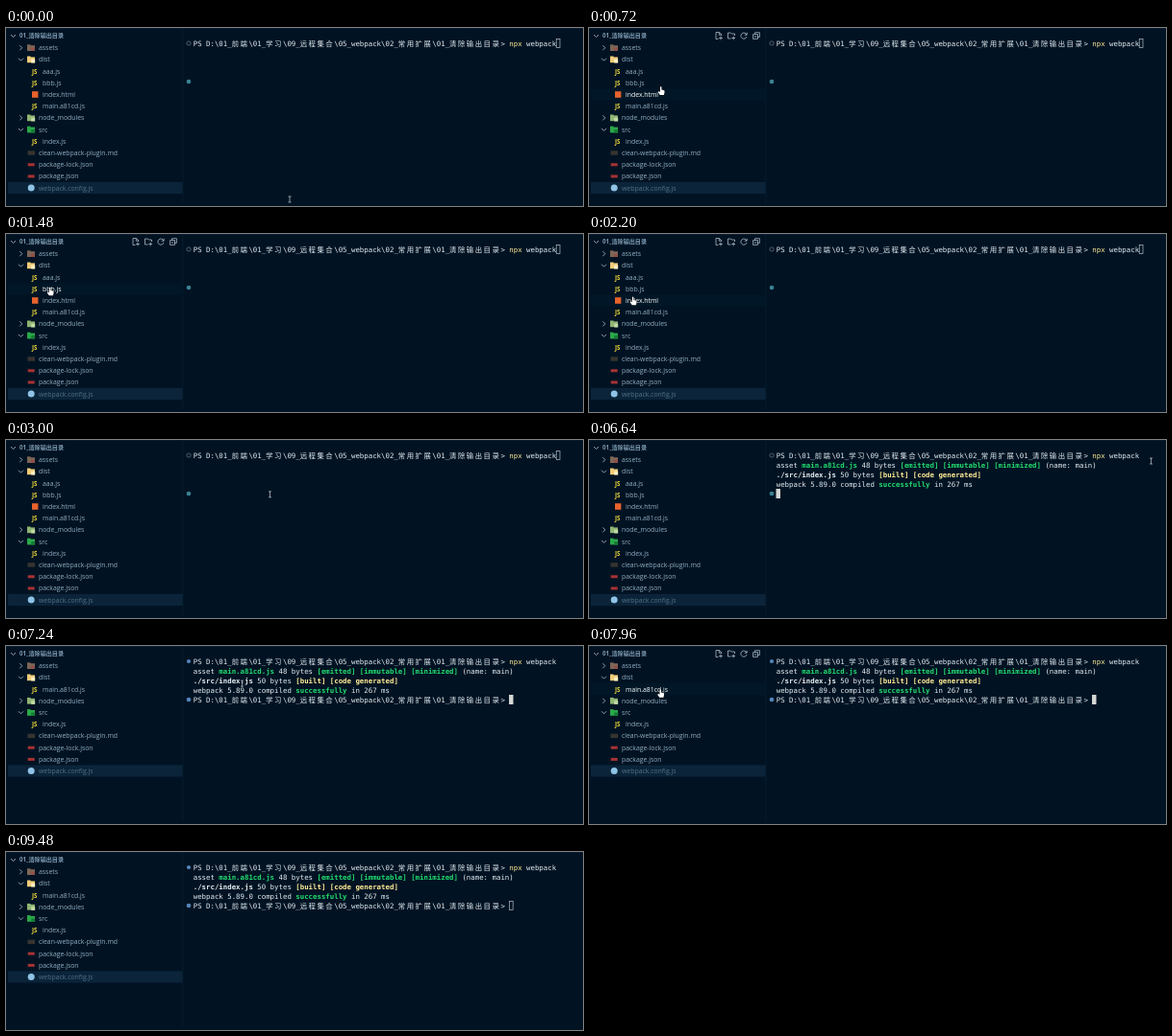
Recreate the animation shown at these times as an HTML page with a canvas. Size 600 by 186 pixels, loop 9520 ms.

```html
<!DOCTYPE html>
<html lang="zh-CN">
<head>
<meta charset="utf-8">
<title>Cleaning the output folder</title>
<style>
  html, body { margin: 0; width: 100%; height: 100%; overflow: hidden; background: #011323; }
  canvas { display: block; width: 600px; height: 186px; }
</style>
</head>
<body>
<canvas id="stage"></canvas>
<script>
const LOOP = 9520, STEP = 40;
const SIDEBAR = 183.5, ROW_TOP = 20.7, ROW = 12.2;
const COL = 4.44, TERM_X = 194.7, TERM_Y = 16, LINE = 10;
const FOCUS = 3880, ENTER = 4200, OUTPUT = 6640, CLEANED = 6960, PROMPT = 7000, BLUR = 9280;
const MOUSE_GONE = 8880;

const UI_FONT = '"Open Sans", "Noto Sans CJK SC", "Noto Sans CJK", sans-serif';
const MONO_FONT = '"DejaVu Sans Mono", "Noto Sans CJK SC", "Noto Sans CJK", monospace';
const BG = '#011323', TEXT = '#93adc1', TITLE = '#7f9bb2', DIM = '#527087', WHITE = '#e4ebf1';
const GREEN = '#22da6e', YELLOW = '#ffeb95', BULLET = '#5485bb';

const PATH = 'PS D:\\01_前端\\01_学习\\09_远程集合\\05_webpack\\02_常用扩展\\01_清除输出目录> ';
const COMMAND = [[PATH, WHITE], ['npx', YELLOW], [' webpack', WHITE]];
const RESULT = [
  [['asset ', WHITE], ['main.a81cd.js', GREEN, 1], [' 48 bytes ', WHITE],
   ['[emitted] [immutable] [minimized]', GREEN, 1], [' (name: main)', WHITE]],
  [['./src/index.js', WHITE, 1], [' 50 bytes ', WHITE], ['[built] [code generated]', YELLOW, 1]],
  [['webpack 5.89.0 compiled ', WHITE], ['successfully', GREEN, 1], [' in 267 ms', WHITE]]
];

// name, icon, indent level, state
const TREE = [
  ['assets', 'assets', 0, 'closed'],
  ['dist', 'dist', 0, 'open'],
  ['aaa.js', 'js', 1, 'removed'],
  ['bbb.js', 'js', 1, 'removed'],
  ['index.html', 'html', 1, 'removed'],
  ['main.a81cd.js', 'js', 1],
  ['node_modules', 'modules', 0, 'closed'],
  ['src', 'src', 0, 'open'],
  ['index.js', 'js', 1],
  ['clean-webpack-plugin.md', 'md', 0],
  ['package-lock.json', 'package', 0],
  ['package.json', 'package', 0],
  ['webpack.config.js', 'config', 0, 'selected']
];
const FOLDERS = { assets: '#7d6557', dist: '#f0cd79', modules: '#8fb573', src: '#2aa84a' };

// time, x, y
const MOUSE = [
  [0, 295, 179], [120, 280, 170], [480, 120, 80], [720, 75, 63.6], [960, 72, 60],
  [1200, 48, 47], [1480, 46, 58], [1760, 50, 84], [1960, 48, 74], [2200, 46, 68],
  [2480, 60, 72], [2840, 190, 66], [3240, 430, 40], [3640, 583, 22], [3840, 584.5, 22],
  [6680, 584.5, 22], [7080, 330, 30], [7480, 90, 56], [7960, 74.5, 47.5], [8240, 70, 50],
  [8520, 110, 70], [8880, 490, 110]
];

const canvas = document.getElementById('stage');
const ctx = canvas.getContext('2d');
const ratio = window.devicePixelRatio || 1;
canvas.width = 600 * ratio;
canvas.height = 186 * ratio;

function rect(x, y, w, h, color) {
  ctx.fillStyle = color;
  ctx.fillRect(x, y, w, h);
}

function circle(x, y, r, color, hollow) {
  ctx.beginPath();
  ctx.arc(x, y, r, 0, 7);
  ctx.fillStyle = ctx.strokeStyle = color;
  ctx.lineWidth = 0.7;
  hollow ? ctx.stroke() : ctx.fill();
}

function stroke(x, y, d, color, width = 0.7) {
  ctx.save();
  ctx.translate(x, y);
  ctx.strokeStyle = color;
  ctx.lineWidth = width;
  ctx.stroke(new Path2D(d));
  ctx.restore();
}

function label(text, x, y, color, font) {
  ctx.font = font;
  ctx.fillStyle = color;
  ctx.fillText(text, x, y);
}

function mouseAt(t) {
  const next = MOUSE.findIndex(p => p[0] > t);
  if (next < 0) return { x: 490, y: 110 };
  const [t0, x0, y0] = MOUSE[next - 1], [t1, x1, y1] = MOUSE[next];
  const k = (t - t0) / (t1 - t0), e = k * k * (3 - 2 * k);
  return { x: x0 + (x1 - x0) * e, y: y0 + (y1 - y0) * e };
}

function chevron(x, y, open) {
  stroke(x, y, open ? 'M-2.5-1.2L0 1.3 2.5-1.2' : 'M-1.2-2.5L1.3 0-1.2 2.5', '#a3b7c6', 0.85);
}

function icon(kind, x, y) {
  if (FOLDERS[kind]) {
    rect(x, y - 3.4, 3.6, 2, FOLDERS[kind]);
    rect(x, y - 2.5, 8, 5.8, FOLDERS[kind]);
    if (kind === 'assets') rect(x + 4, y, 4, 3.3, '#8f5048');
    if (kind === 'dist') rect(x + 4.2, y - 0.2, 4, 3.8, '#fff0c4');
    if (kind === 'modules') rect(x + 4.2, y - 0.2, 4, 3.8, '#c3d9a5');
    if (kind === 'src') rect(x + 4.2, y, 4, 3.4, '#147c35');
  } else if (kind === 'js') {
    label('JS', x + 1, y + 2.5, '#f0d83c', 'bold 6.2px ' + UI_FONT);
  } else if (kind === 'html') {
    rect(x + 1, y - 3.3, 6.4, 6.6, '#e8622c');
  } else if (kind === 'md') {
    rect(x + 0.5, y - 2.2, 7.5, 4.4, '#37342f');
  } else if (kind === 'package') {
    rect(x + 0.7, y - 1.4, 7, 3, '#a83232');
  } else {
    circle(x + 4.2, y, 3.5, '#8fc3e6');
  }
}

function toolbar() {
  const color = '#c3ced8';
  stroke(135, 8, 'M3-.5V-1L.5-3.5H-3V3.5H-.5M.3-3.5V-.8H3M2 .6V4.4M.1 2.5H3.9', color);
  stroke(148, 8, 'M3.5 0V-2H.3L-.7-3H-3.5V3H-.5M2.2 .6V4.4M.3 2.5H4.1', color);
  stroke(161, 8, 'M2.9-1A3.1 3.1 0 1 0 3 1M3.2-3.3V-.8H.7', color);
  stroke(174, 8, 'M-1.4-1.4V-3.3H3.4V1.4H1.5M-3.4-1.4H1.5V3.4H-3.4ZM-2.2 1H.3', color);
}

function sidebar(t, mouse) {
  const hovered = mouse && mouse.x < SIDEBAR;
  chevron(7.5, 8.2, true);
  label('01_清除输出目录', 14, 10.4, TITLE, 'bold 6.1px ' + UI_FONT);
  if (hovered) toolbar();

  const rows = TREE.filter(row => row[3] !== 'removed' || t < CLEANED);
  rows.forEach(([name, kind, level, state], i) => {
    const y = ROW_TOP + i * ROW, x = 22 + level * 4;
    const hot = hovered && Math.abs(mouse.y - y) < ROW / 2;
    if (state === 'selected') rect(2, y - ROW / 2, SIDEBAR - 2, ROW, '#0b2439');
    else if (hot) rect(2, y - ROW / 2, SIDEBAR - 2, ROW, '#011727');
    if (FOLDERS[kind]) chevron(15.5, y, state === 'open');
    icon(kind, x, y);
    const color = hot ? '#ffffff' : state === 'selected' ? DIM : TEXT;
    label(name, x + 12, y + 2.4, color, '6.88px ' + UI_FONT);
  });
}

// Draws one terminal line on the character grid; wide characters take two cells.
function termLine(spans, row) {
  let col = 0;
  for (const [text, color, bold] of spans) {
    const font = (bold ? 'bold ' : '') + '7.4px ' + MONO_FONT;
    for (const char of text) {
      label(char, TERM_X + col * COL, TERM_Y + row * LINE + 2.6, color, font);
      col += char > '\u2e80' ? 2 : 1;
    }
  }
}

function termCursor(col, row, filled) {
  const x = TERM_X + col * COL - 0.2, y = TERM_Y + row * LINE - 5;
  if (filled) return rect(x, y, COL, LINE, '#d5d8d6');
  ctx.strokeStyle = '#b4bec7';
  ctx.lineWidth = 0.7;
  ctx.strokeRect(x + 0.35, y + 0.4, COL - 0.7, LINE - 0.8);
}

function terminal(t) {
  const prompted = t >= PROMPT;
  termLine(COMMAND, 0);
  if (t >= OUTPUT) RESULT.forEach((spans, i) => termLine(spans, i + 1));
  if (prompted) termLine([[PATH, WHITE]], 4);

  circle(190, TERM_Y, 2.1, prompted ? BULLET : '#6a7a88', !prompted);
  circle(190, TERM_Y + 4 * LINE, 2.3, prompted ? BULLET : '#3c8293');

  const [col, row] = t < ENTER ? [85, 0] : t < OUTPUT ? [0, 1] : t < PROMPT ? [0, 4] : [74, 4];
  termCursor(col, row, t >= FOCUS && t < BLUR);
}

function pointer({ x, y }) {
  if (x >= SIDEBAR) {
    stroke(x, y, 'M-1.5-3H1.5M0-3V3M-1.5 3H1.5', '#c5ccd2');
    return;
  }
  ctx.save();
  ctx.translate(x, y - 2);
  const hand = new Path2D('M-1 0Q-.3-.8 .4 0V3L2.6 3.4Q3.7 3.7 3.6 5L3 8.3H-1.2L-3.2 5.4Q-3 4.4-1.9 4.6L-1 5.4Z');
  ctx.fillStyle = '#ffffff';
  ctx.strokeStyle = '#0a0f14';
  ctx.lineWidth = 0.9;
  ctx.stroke(hand);
  ctx.fill(hand);
  ctx.restore();
}

function draw(now) {
  const t = Math.floor(now % LOOP / STEP) * STEP;
  const mouse = t <= MOUSE_GONE ? mouseAt(t) : null;
  ctx.setTransform(ratio, 0, 0, ratio, 0, 0);
  rect(0, 0, 600, 186, BG);
  rect(0, 0, 600, 1, '#061a2c');
  rect(SIDEBAR, 0, 0.7, 183, '#0a2033');
  sidebar(t, mouse);
  terminal(t);
  if (mouse) pointer(mouse);
}

const start = performance.now();
function tick() {
  draw(performance.now() - start);
  requestAnimationFrame(tick);
}
tick();
</script>
</body>
</html>
```
